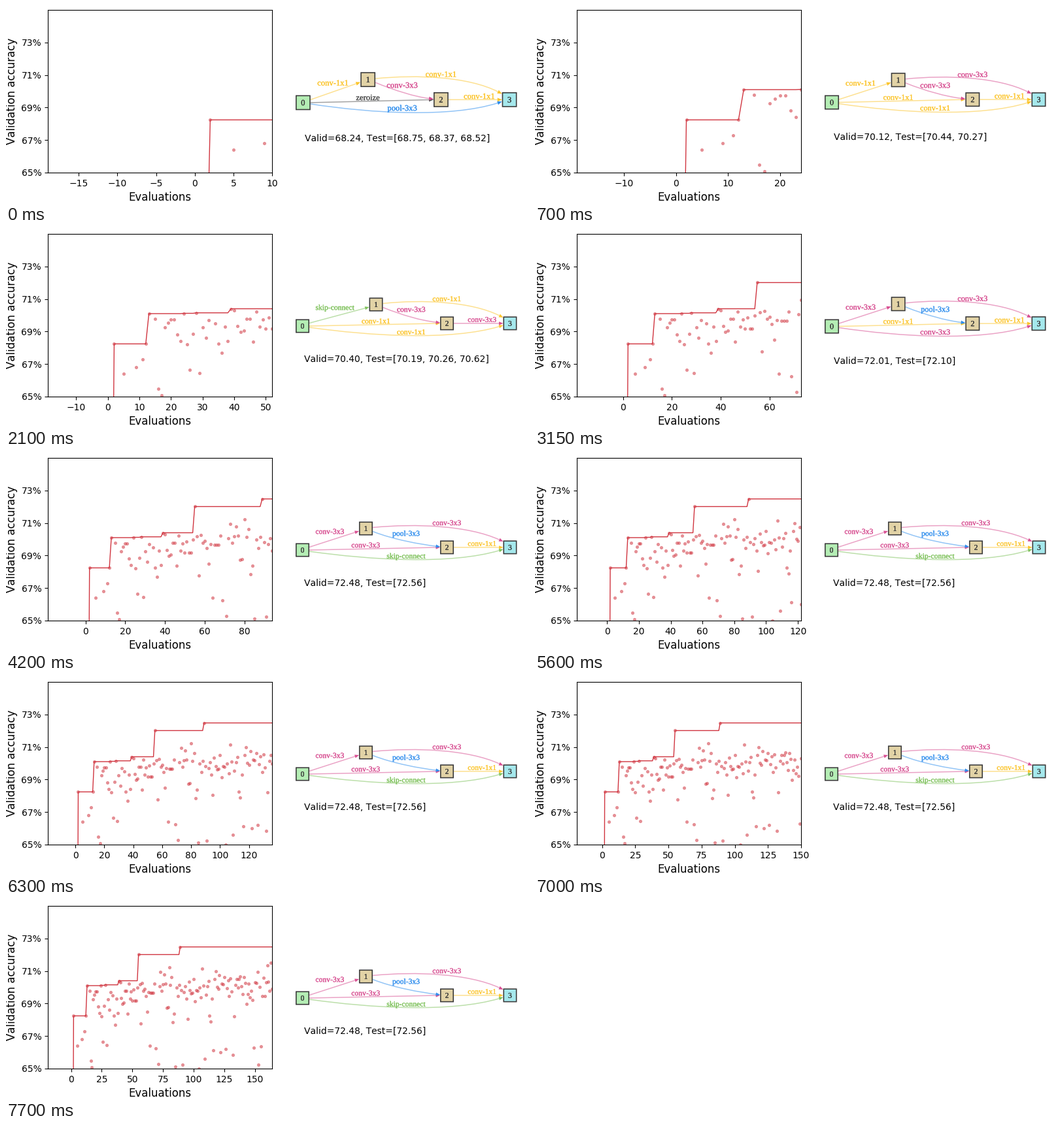
A matplotlib script that plays this animation: 800 by 300 pixels, repeating every 8 s.

```python
import numpy as np
import matplotlib.pyplot as plt
from matplotlib.animation import FuncAnimation
from matplotlib.patches import PathPatch, Polygon, Rectangle
from matplotlib.patheffects import withStroke
from matplotlib.path import Path

W, H, DPI = 800, 300, 100
PX = 72 / DPI
TICK_MS, HOLD_MS, LOOP_MS = 50, 350, 8000
RED = "#d0343f"
INK = "#3a3a3a"

# code: label, colour, label width at full scale
OPS = {
    "1": ("conv-1x1", "#fcc52c", 48),
    "3": ("conv-3x3", "#d84f92", 48),
    "p": ("pool-3x3", "#2f8eee", 46),
    "s": ("skip-connect", "#7fc25c", 65),
    "z": ("zeroize", "#505050", 36),
}
# evaluation, accuracy, operations on edges 01 02 03 12 13 23, test runs
RECORDS = [
    (2, 68.24, "1zp311", "68.75, 68.37, 68.52"),
    (13, 70.10, "111311", "70.31, 70.08"),
    (24, 70.12, "111331", "70.44, 70.27"),
    (28, 70.15, "111313", "70.22, 70.36"),
    (39, 70.40, "s11313", "70.19, 70.26, 70.62"),
    (55, 72.01, "313p31", "72.10"),
    (89, 72.48, "33sp31", "72.56"),
]
WARMUP = {1: 47, 5: 66.4, 9: 66.8, 11: 67.3, 12: 68.24}
LAST = 164


def make_scores():
    """A rising cloud with a thinning tail of weak results, capped by the record."""
    rng = np.random.default_rng(8)
    n = LAST + 1
    good = rng.normal(np.linspace(69.65, 70.2, n), 0.55)
    weak = rng.uniform(64.3, 69, n)
    score = np.where(rng.random(n) < np.linspace(0.5, 0.12, n), weak, good)
    record = np.zeros(n)
    for at, value, *_ in RECORDS:
        record[at:] = value
    score = np.minimum(score, record - rng.uniform(0.05, 0.6, n))
    score[:12] = 0
    for at, value in WARMUP.items():
        score[at] = value
    for at, value, *_ in RECORDS:
        score[at] = value
    return score


acc = make_scores()
best = np.maximum.accumulate(acc)
evals = np.arange(LAST + 1)

plt.rcParams["font.family"] = "DejaVu Sans"
plt.rcParams["text.kerning_factor"] = 6
fig = plt.figure(figsize=(W / DPI, H / DPI), dpi=DPI, facecolor="white")

ax = fig.add_axes([64 / W, 45 / H, 343 / W, 249 / H])
ax.set_ylim(65, 75)
ax.set_yticks(range(65, 75, 2), [f"{v}%" for v in range(65, 75, 2)])
ax.set_xlabel("Evaluations", fontsize=12)
ax.set_ylabel("Validation accuracy", fontsize=12)
line, = ax.plot([], [], color=RED, lw=1)
dots, = ax.plot([], [], "o", color=RED, ms=3.7, mew=0, alpha=0.55)

stage = fig.add_axes([0, 0, 1, 1])
stage.set_xlim(0, W)
stage.set_ylim(H, 0)
stage.axis("off")


def serif(x, y, text, px, color):
    return stage.text(x, y + 0.33 * px, text, fontsize=px * PX, color=color,
                      family="Liberation Serif", ha="center", va="baseline",
                      path_effects=[withStroke(linewidth=0.15, foreground=color)])


def arrow(points, color, k):
    """Cubic curve through four control points with a filled head."""
    p = np.array(points, float)
    way = (p[3] - p[2]) / np.hypot(*(p[3] - p[2]))
    side = np.array([-way[1], way[0]]) * 2.9 * k
    neck = p[3] - way * 7 * k
    curve = Path([p[0], p[1], p[2], neck], [Path.MOVETO] + [Path.CURVE4] * 3)
    return [
        stage.add_patch(PathPatch(curve, fill=False, ec=color, lw=1.1, alpha=0.52)),
        stage.add_patch(Polygon([p[3], neck + side, neck - side], fc=color, lw=0)),
    ]


def straight(a, b):
    a, b = np.array(a), np.array(b)
    return [a, a + (b - a) / 3, a + (b - a) * 2 / 3, b]


def build_cell(at, value, ops, tests):
    # Columns are as wide as their labels; the whole graph is scaled to fit.
    w01, w02, w03, w12, w13, w23 = (OPS[op][2] for op in ops)
    wide = max(w03, w12)
    gaps = np.array([34 + w01 + w02 / 2, 46.6 + w02 / 2 + wide, 33.5 + w13 / 2 + w23])
    k = 338.5 / (23 + gaps.sum())
    d = (1 - k) / 0.085
    h, px = 11.5 * k, 12.7 * k
    x0, x1, x2, x3 = 443 + h + k * np.append(0, gaps.cumsum())
    y0, y1, y2 = 148 - d, 112.5 + 1.5 * d, 143.4 - 0.5 * d
    span = x3 - x1
    curves = [
        straight((x0 + h, y0 - 4.5), (x1 - h, y1 + 4)),
        straight((x0 + h, y0), (x2 - h, y2)),
        [(x0 + h, y0 + 2), (x0 + 105, y0 + 16.5 - d), (x3 - 90, y0 + 23.5 - d),
         (x3 - h, y2 + 3)],
        [(x1 + h, y1 + 4.5), (x1 + 42, y1 + 17), (x2 - 40, y2 - 4.5), (x2 - h, y2 - 1)],
        [(x1 + h, y1 - 1.5), (x1 + 0.35 * span, y1 - 8), (x1 + 0.71 * span, y1 - 4.5),
         (x3 - h, y2 - 9)],
        straight((x2 + h, y2), (x3 - h, y2)),
    ]
    mid = x1 + k * (11 + w02 / 2 + wide / 2)
    labels = [
        (x0 + k * (22 + w01 / 2), 117.4 + d), (x1, 140 - 0.7 * d), (mid, 156),
        (mid, 121 + 0.4 * d), (x2, 104.2 + d),
        (x2 + k * (11 + w13 / 2 + w23 / 2), 138 - d),
    ]
    parts = []
    for op, curve, (lx, ly) in zip(ops, curves, labels):
        name, color, _ = OPS[op]
        parts += arrow(curve, color, k)
        parts.append(serif(lx, ly, name, px, color))
    nodes = [(x0, y0, "#b4edb4"), (x1, y1, "#e2d3a6"), (x2, y2, "#e2d3a6"),
             (x3, y2, "#a5e8ec")]
    for i, (x, y, fill) in enumerate(nodes):
        parts.append(stage.add_patch(Rectangle(
            (x - h + 0.8, y - h + 0.8), 2 * h - 1.6, 2 * h - 1.6,
            fc=fill, ec=INK, lw=1.15, zorder=2, snap=False)))
        parts.append(serif(x, y, str(i), px, INK))
    parts.append(stage.text(457.2 - d, 207.5 - 5.5 * d,
                            f"Valid={value:.2f}, Test=[{tests}]", fontsize=10))
    return parts


cells = {record[0]: build_cell(*record) for record in RECORDS}


def update(frame):
    n = 10 + 7 * (frame * TICK_MS // HOLD_MS)
    ax.set_xlim(-19, n)
    line.set_data(evals[1:n + 1], best[1:n + 1])
    dots.set_data(evals[1:n + 1], acc[1:n + 1])
    current = max(at for at in cells if at <= n)
    for at, parts in cells.items():
        for part in parts:
            part.set_visible(at == current)
    return []


anim = FuncAnimation(fig, update, frames=LOOP_MS // TICK_MS, interval=TICK_MS,
                     repeat=True, repeat_delay=0, blit=False)
plt.show()
```
